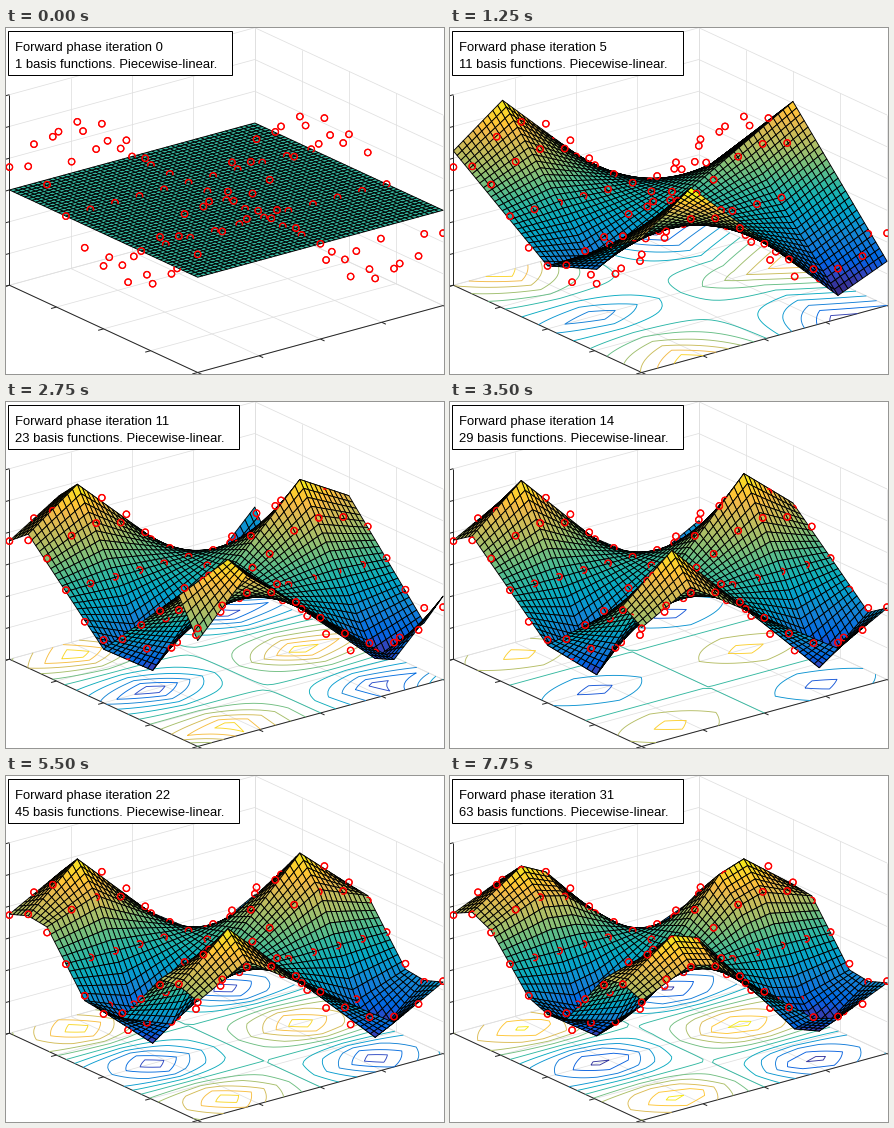
These frames come from a looping animation (438x346 px, 8 s). A matplotlib script:

```python
import numpy as np
import matplotlib.pyplot as plt
from matplotlib.animation import FuncAnimation
from matplotlib.collections import LineCollection, PolyCollection
from matplotlib.colors import LinearSegmentedColormap, Normalize
from matplotlib.patches import Rectangle

W, H, DPI = 438, 346, 64
PX = 72 / DPI                      # points per pixel
STEPS, INTERVAL = 32, 250
CELLS = 50
ZMAX = 1.5
TINY = 1e-8

# ---- view: orthographic, all coordinates scaled to the unit cube ----
AZ, EL = np.radians(37.5), np.radians(30)
CA, SA, CE, SE = np.cos(AZ), np.sin(AZ), np.cos(EL), np.sin(EL)
SX, SY = 309.3, 220
ORIGIN = 191.7, 344.5


def project(u, v, w):
    x = ORIGIN[0] + SX * (CA * u - SA * v)
    y = ORIGIN[1] - SY * (SE * (SA * u + CA * v) + CE * w)
    return np.stack(np.broadcast_arrays(x, y), axis=-1)


def unit_z(z):
    return (z + ZMAX) / (2 * ZMAX)


PARULA = LinearSegmentedColormap.from_list("parula", [(i / 63, c) for i, c in [
    (0, (.208, .166, .529)), (3, (.208, .239, .677)), (5, (.171, .292, .779)),
    (7, (.059, .360, .868)), (9, (.006, .409, .883)), (13, (.063, .474, .855)),
    (16, (.079, .520, .831)), (21, (.027, .614, .814)), (25, (.027, .664, .761)),
    (29, (.113, .702, .686)), (32, (.218, .725, .619)), (36, (.395, .746, .524)),
    (40, (.571, .749, .449)), (44, (.710, .743, .390)), (48, (.834, .734, .334)),
    (52, (.945, .727, .289)), (54, (.999, .765, .216)), (58, (.979, .839, .168)),
    (60, (.960, .900, .120)), (63, (.976, .983, .054))]])

# ---- data and mesh ----
axis = np.linspace(-1, 1, 11)
data = np.array([g.ravel() for g in np.meshgrid(axis, axis, indexing="ij")])
target = np.sin(.83 * np.pi * data[0]) * np.cos(1.25 * np.pi * data[1])
unit = np.linspace(0, 1, CELLS + 1)
MU, MV = np.meshgrid(unit, unit, indexing="ij")
mesh = np.array([2 * MU - 1, 2 * MV - 1])
KNOTS = axis[1:-1], axis[-2:0:-1]


def hinge(x, t):
    return np.maximum(x - t, 0)


def best_pair(basis, q, resid):
    """Find the parent, variable and knot whose hinge pair cuts the error most."""
    def perp(m):
        for _ in range(2):
            m = m - q @ (q.T @ m)
        return m

    best = 0, None
    for parent in basis:
        col, _, used = parent
        for var in {0, 1} - used:
            line = perp((col * data[var])[:, None])
            norm = np.sum(line ** 2)
            line = line / np.sqrt(norm) if norm > TINY else 0 * line
            bends = perp(col[:, None] * hinge(data[var][:, None], KNOTS[var]))
            bends = bends - line @ (line.T @ bends)
            norms = np.sum(bends ** 2, axis=0)
            bends = np.where(norms > TINY, bends / np.sqrt(np.maximum(norms, TINY)), 0)
            gains = (line[:, 0] @ resid) ** 2 + (bends.T @ resid) ** 2
            for k, gain in enumerate(gains):
                if gain > best[0] * (1 + 1e-6):
                    new = np.column_stack([line[:, 0], bends[:, k]])
                    best = gain, (parent, var, KNOTS[var][k], new)
    return best[1]


def forward_pass():
    """Grow the piecewise-linear model and return its surface at each step."""
    basis = [(np.ones(data.shape[1]), np.ones_like(MU), set())]
    q = np.full((data.shape[1], 1), 1 / np.sqrt(data.shape[1]))
    surfaces = []
    for _ in range(STEPS):
        design = np.column_stack([b[0] for b in basis])
        coef = np.linalg.lstsq(design, target, rcond=1e-10)[0]
        surfaces.append(sum(c * b[1] for c, b in zip(coef, basis)))
        pick = best_pair(basis, q, target - q @ (q.T @ target))
        if pick is None:
            continue
        (col, grid, used), var, t, new = pick
        for sign in (1, -1):
            basis.append((col * hinge(sign * data[var], sign * t),
                          grid * hinge(sign * mesh[var], sign * t), used | {var}))
        q = np.hstack([q, new[:, np.sum(new ** 2, axis=0) > .5]])
    return surfaces


surfaces = forward_pass()

# ---- markers: screen-facing rings, cut where the surface hides them ----
ARCS, RADIUS = 24, 3.2
angle = np.linspace(0, 2 * np.pi, ARCS + 1)
centre = project((data[0] + 1) / 2, (data[1] + 1) / 2, unit_z(target))
ring = RADIUS * np.stack([np.cos(angle), np.sin(angle)], axis=-1)
outline = centre[:, None] + ring
arcs = np.stack([outline[:, :-1], outline[:, 1:]], axis=2).reshape(-1, 2, 2)

# rays from the middle of each arc towards the viewer
mid = angle[:-1] + np.pi / ARCS
right, up = RADIUS * np.cos(mid) / SX, -RADIUS * np.sin(mid) / SY
reach = np.linspace(0, 1.45, 100)


def rays(start, along_right, along_up, along_view):
    first = start[:, None] + along_right * right + along_up * up
    return first.reshape(-1, 1) + along_view * reach


RU = rays((data[0] + 1) / 2, CA, SA * SE, -SA * CE)
RV = rays((data[1] + 1) / 2, -SA, CA * SE, -CA * CE)
RZ = rays(unit_z(target), 0, CE, SE) * 2 * ZMAX - ZMAX
inside = (RU >= 0) & (RU <= 1) & (RV >= 0) & (RV <= 1)
gu, gv = RU[inside] * CELLS, RV[inside] * CELLS
iu = np.minimum(gu.astype(int), CELLS - 1)
iv = np.minimum(gv.astype(int), CELLS - 1)
fu, fv = gu - iu, gv - iv


def visible_arcs(z):
    """Keep the arcs whose rays never pass through the surface."""
    height = ((z[iu, iv] * (1 - fu) + z[iu + 1, iv] * fu) * (1 - fv)
              + (z[iu, iv + 1] * (1 - fu) + z[iu + 1, iv + 1] * fu) * fv)
    side = np.zeros(RU.shape)
    side[inside] = np.sign(RZ[inside] - height + .01)
    crossed = side[:, 1:] * side[:, :-1] < 0
    return arcs[~crossed.any(axis=1)]


# ---- stage ----
fig = plt.figure(figsize=(W / DPI, H / DPI), dpi=DPI, facecolor="white")
ax = fig.add_axes([0, 0, 1, 1])
ax.set_xlim(0, W)
ax.set_ylim(H, 0)
ax.axis("off")


def segments(pairs, color, zorder, width=.75):
    lines = [project(*np.array(pair, float).T) for pair in pairs]
    ax.add_collection(LineCollection(lines, colors=color, linewidths=width * PX,
                                     zorder=zorder), autolim=False)


quarter, sixth = np.linspace(0, 1, 5), np.linspace(0, 1, 7)
grid = []
for a in quarter:
    grid += [[(a, 0, 0), (a, 1, 0)], [(a, 1, 0), (a, 1, 1)],
             [(0, a, 0), (1, a, 0)], [(1, a, 0), (1, a, 1)]]
for a in sixth:
    grid += [[(0, 1, a), (1, 1, a)], [(1, 0, a), (1, 1, a)]]
segments(grid, "#dfdfdf", 1)

TICK = .022
frame = [[(0, 1, 0), (0, 1, 1)], [(0, 0, 0), (0, 1, 0)], [(0, 0, 0), (1, 0, 0)]]
frame += [[(a, 0, 0), (a, -TICK, 0)] for a in quarter]
frame += [[(0, a, 0), (-TICK, a, 0)] for a in quarter]
frame += [[(0, 1, a), (-TICK, 1, a)] for a in sixth]
segments(frame, "#262626", 2, 1)

order = np.argsort(-(SA * MU + CA * MV)[:-1, :-1].ravel(), kind="stable")
surface = PolyCollection([], edgecolors="black", linewidths=.9 * PX, zorder=4)
rings = LineCollection([], colors="red", linewidths=1.3 * PX,
                       capstyle="round", zorder=5)
ax.add_collection(surface, autolim=False)
ax.add_collection(rings, autolim=False)

box = Rectangle((2.5, 3.5), 224, 44, facecolor="white", edgecolor="black",
                linewidth=PX, snap=False, zorder=6)
ax.add_patch(box)
labels = [ax.text(9.2, y, "", family="Liberation Sans", size=13 * PX,
                  va="baseline", zorder=7) for y in (22.5, 39.5)]

floor = project(MU, MV, 0 * MU)
drawn = []


def color_scale(z):
    low, high = z.min(), z.max()
    if high - low < 1e-6:
        low, high = low - 1, high + 1
    return Normalize(low, high)


def contour_levels(z):
    span = np.ptp(z)
    if span < 1e-6:
        return []
    decade = 10 ** np.floor(np.log10(span))
    ratio = span / decade
    step = decade * (.1 if ratio < 1.2 else .2 if ratio < 2.4 else .5 if ratio < 6 else 1)
    ticks = np.arange(np.ceil(z.min() / step), np.floor(z.max() / step) + 1)
    return ticks * step


def draw_contours(z, norm):
    while drawn:
        drawn.pop().remove()
    levels = contour_levels(z)
    if len(levels):
        drawn.append(ax.contour(floor[..., 0], floor[..., 1], z, levels=levels,
                                cmap=PARULA, norm=norm, linewidths=.9 * PX,
                                linestyles="solid", zorder=3))


def update(i):
    z = surfaces[i]
    norm = color_scale(z)
    p = project(MU, MV, unit_z(z))
    quads = np.stack([p[:-1, :-1], p[1:, :-1], p[1:, 1:], p[:-1, 1:]], axis=2)
    surface.set_verts(quads.reshape(-1, 4, 2)[order])
    surface.set_facecolor(PARULA(norm(z[:-1, :-1].ravel()[order])))
    draw_contours(z, norm)
    rings.set_segments(visible_arcs(z))
    count = 2 * i + 1
    box.set_width(224 if count < 10 else 231)
    labels[0].set_text(f"Forward phase iteration {i}")
    labels[1].set_text(f"{count} basis functions. Piecewise-linear.")
    return []


anim = FuncAnimation(fig, update, frames=STEPS, interval=INTERVAL,
                     init_func=lambda: [], repeat=True, repeat_delay=0, blit=False)
plt.show()
```
